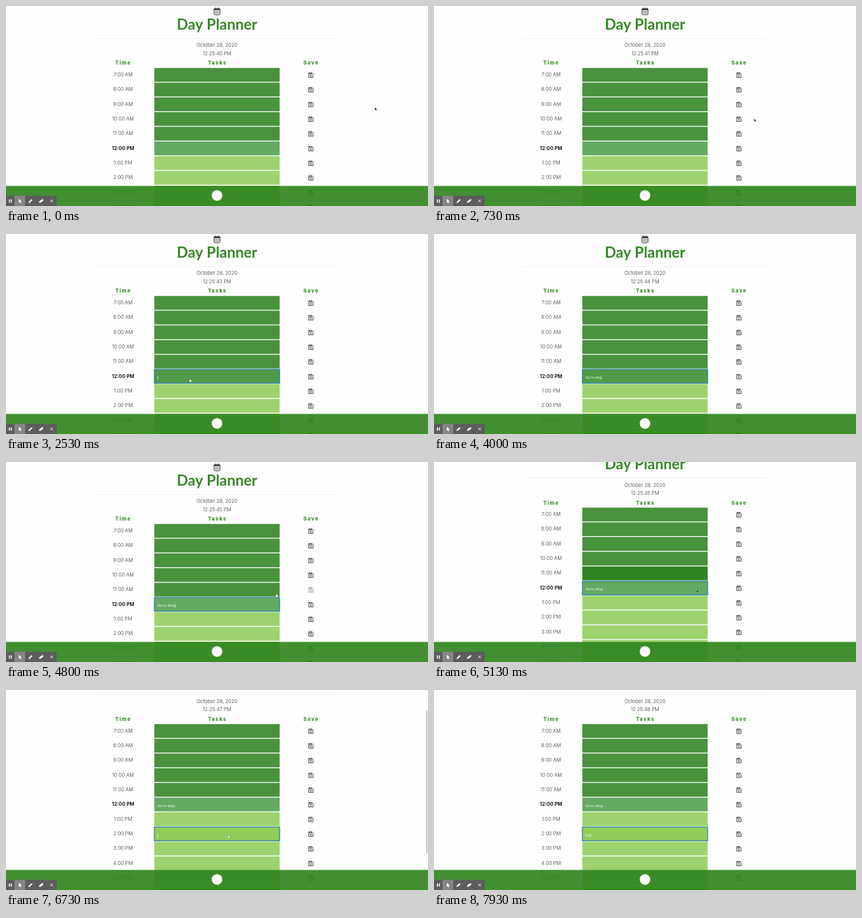
An HTML page with a canvas that plays this animation: 640 px wide and 304 px high, repeating every 8000 ms.

```html
<!DOCTYPE html>
<html lang="en">
<head>
<meta charset="utf-8">
<title>Day Planner</title>
<style>
  html, body { margin: 0; width: 100%; height: 100%; overflow: hidden; background: #fdfefd; }
  canvas { display: block; width: 640px; height: 304px; }
</style>
</head>
<body>
<canvas id="stage" width="640" height="304"></canvas>
<script>
const ctx = document.getElementById('stage').getContext('2d');
const LOOP = 8000;
const FONT = 'Inter, "Open Sans", sans-serif';
const PITCH = 22.35, ROW_TOP = 94.2, ROW_H = 21, CELL_X = 225, CELL_W = 190;

// base and hovered colours
const TONES = {
  past: [[74, 146, 62], [48, 132, 36]],
  now: [[101, 170, 98], [79, 155, 73]],
  next: [[157, 211, 110], [144, 204, 89]]
};

// row index -> [enter, leave]
const HOVERS = { 5: [830, 4560], 4: [4790, 5240], 6: [5240, 5640], 7: [5640, 1e5] };
const FOCUS = [
  { row: 5, from: 1460, to: 6460 },
  { row: 7, from: 6460, to: 1e5 }
];

// [time, x, y]
const MOUSE = [
  [0, 559, 154], [530, 559, 154], [1130, 276, 220], [1330, 278, 220],
  [4400, 278, 220], [4620, 462, 194], [4800, 409, 200], [4930, 398, 194],
  [5240, 398, 194], [5900, 336, 220], [8000, 336, 220]
];
const SCROLL = [[0, 0], [5000, 0], [5130, 24.6], [5200, 42.4], [8000, 42.4]];

const clamp = v => Math.max(0, Math.min(1, v));
const smooth = u => u * u * (3 - 2 * u);
const mix = (a, b, u) => a + (b - a) * u;

function track(keys, t, col, ease = u => u) {
  let i = 1;
  while (i < keys.length - 1 && t > keys[i][0]) i++;
  const a = keys[i - 1], b = keys[i];
  return mix(a[col], b[col], ease(clamp((t - a[0]) / (b[0] - a[0]))));
}

function pulse(t, from, to, fade = 200) {
  return Math.min(clamp((t - from) / fade), 1 - clamp((t - to) / fade));
}

function rect(x, y, w, h, color) {
  ctx.fillStyle = color;
  ctx.fillRect(x, y, w, h);
}

function rounded(x, y, w, h, r) {
  ctx.beginPath();
  ctx.roundRect(x, y, w, h, r);
}

function poly(points, fill, stroke, width = 0.6) {
  ctx.beginPath();
  points.forEach(([x, y]) => ctx.lineTo(x, y));
  ctx.closePath();
  if (stroke) {
    ctx.strokeStyle = stroke;
    ctx.lineWidth = width;
    ctx.stroke();
  }
  ctx.fillStyle = fill;
  ctx.fill();
}

function text(str, x, y, font, color, align = 'center', spacing = 0) {
  ctx.font = font + ' ' + FONT;
  ctx.textAlign = align;
  ctx.letterSpacing = spacing + 'px';
  ctx.fillStyle = color;
  ctx.fillText(str, x, y);
  ctx.letterSpacing = '0px';
}

function calendar() {
  ctx.strokeStyle = '#333';
  ctx.lineWidth = 1;
  rounded(315.5, 4, 9, 9.3, 1);
  ctx.stroke();
  rect(315.5, 4, 9, 2.3, '#333');
  rect(317.2, 2.4, 1.2, 2, '#333');
  rect(321.6, 2.4, 1.2, 2, '#333');
  for (let i = 0; i < 6; i++) {
    rect(317 + (i % 3) * 2.3, 7.7 + Math.floor(i / 3) * 2.3, 1.4, 1.4, '#444');
  }
}

function saveIcon(x, y, alpha) {
  ctx.save();
  ctx.translate(x, y);
  ctx.globalAlpha = alpha;
  ctx.strokeStyle = '#333';
  ctx.lineWidth = 0.9;
  ctx.beginPath();
  ctx.moveTo(-3.4, -3.4);
  ctx.lineTo(1.8, -3.4);
  ctx.lineTo(3.4, -1.8);
  ctx.lineTo(3.4, 3.4);
  ctx.lineTo(-3.4, 3.4);
  ctx.closePath();
  ctx.stroke();
  ctx.lineWidth = 0.7;
  ctx.strokeRect(-1.9, -3.3, 3.2, 2);
  ctx.beginPath();
  ctx.arc(0, 1, 1.1, 0, 7);
  ctx.stroke();
  ctx.restore();
}

function typed(row, t) {
  if (row === 5) {
    const n = t < 4200 ? Math.min(9, Math.floor((t - 3260) / 90) + 1) : 10;
    return 'Go to shop'.slice(0, Math.max(0, n));
  }
  if (row === 7) return 'Go'.slice(0, (t >= 7730) + (t >= 7860));
  return '';
}

function drawRow(i, t) {
  const y = ROW_TOP + i * PITCH, hour = 7 + i;
  const label = (hour > 12 ? hour - 12 : hour) + ':00 ' + (hour < 12 ? 'AM' : 'PM');
  const span = HOVERS[i];
  const over = span ? pulse(t, span[0], span[1]) : 0;
  const [base, lit] = TONES[i < 5 ? 'past' : i === 5 ? 'now' : 'next'];

  text(label, 177.5, y + 12.7, (i === 5 ? 700 : 300) + ' 7.5px', i === 5 ? '#222' : '#333');
  rect(CELL_X, y, CELL_W, ROW_H, `rgb(${base.map((c, k) => Math.round(mix(c, lit[k], over)))})`);

  const entry = typed(i, t);
  text(entry, 230, y + 14.4, '400 5.1px', '#fff', 'left');
  const width = ctx.measureText(entry).width;

  const focus = FOCUS.find(f => f.row === i && t >= f.from && t < f.to);
  if (focus) {
    ctx.strokeStyle = '#237da6';
    ctx.lineWidth = 1.2;
    ctx.strokeRect(CELL_X, y, CELL_W, ROW_H);
    const typing = i === 5 ? t > 3260 && t < 4500 : t > 7730;
    const blink = (t - focus.from + 40) % 1000 < 500;
    if (typing || blink) rect(230.4 + width, y + 9.7, 0.6, 6, '#fff');
  }
  const dim = i === 4 ? 0.5 * pulse(t, 4580, 4800, 100) : 0;
  saveIcon(462.4, y + 10.9, 1 - dim);
}

function drawPage(t) {
  ctx.save();
  ctx.translate(0, -track(SCROLL, t, 1));
  calendar();
  ctx.font = '700 22.5px Lato, "Open Sans", sans-serif';
  ctx.textAlign = 'center';
  ctx.fillStyle = '#358726';
  ctx.fillText('Day Planner', 320, 36);
  rect(135, 49, 370, 0.6, '#e4e6e4');
  text('October 28, 2020', 320, 62.4, '300 7.5px', '#333');
  const sec = 40 + Math.floor((t + 800) / 1000);
  text(`12:25:${sec} PM`, 320, 74.6, '300 7.4px', '#333');
  text('Time', 177.8, 89.4, '800 7.7px', '#3c912f', 'center', 1.2);
  text('Tasks', 320.5, 89.4, '800 7.7px', '#3c912f', 'center', 1.2);
  text('Save', 462.8, 89.4, '800 7.7px', '#3c912f', 'center', 1.2);
  for (let i = 0; i < 12; i++) drawRow(i, t);
  ctx.restore();
}

function drawFooter() {
  rect(0, 273.5, 640, 30.5, 'rgba(48, 132, 30, 0.91)');
  ctx.fillStyle = '#fff';
  ctx.beginPath();
  ctx.arc(320, 288, 8, 0, 7);
  ctx.fill();
}

function drawToolbar() {
  ctx.fillStyle = '#5d5d5d';
  rounded(0, 288.4, 77, 17, [0, 2, 0, 0]);
  ctx.fill();
  rect(13, 288.4, 16, 16, '#858585');
  rect(4.6, 294, 1.4, 5, '#fff');
  rect(7.4, 294, 1.4, 5, '#fff');
  poly([[19.5, 293], [19.5, 299.2], [21, 297.9], [22, 300], [22.9, 299.6], [22, 297.5], [23.9, 297.4]], '#fff');
  poly([[34.2, 299.4], [34.6, 297.5], [38.6, 293.5], [40.2, 295.1], [36.1, 299]], '#fff');
  poly([[50, 298], [51.4, 296], [55.8, 293.2], [56.8, 294.8], [55.6, 296.8], [51.2, 299.5]], '#fff');
  ctx.strokeStyle = '#fff';
  ctx.lineWidth = 0.9;
  ctx.beginPath();
  for (const s of [-1, 1]) {
    ctx.moveTo(67.2, 296.4 - 2 * s);
    ctx.lineTo(71.2, 296.4 + 2 * s);
  }
  ctx.stroke();
}

function drawScrollbar(t) {
  if (t < 5220) return;
  ctx.globalAlpha = 1 - clamp((t - 6500) / 400);
  ctx.fillStyle = '#858585';
  rounded(637, 31, 2.4, 217, 1.2);
  ctx.fill();
  ctx.globalAlpha = 1;
}

function drawMouse(t) {
  if ((t > 3260 && t < 4400) || t > 7730) return;
  const arrow = t < 830 || (t > 4900 && t < 5260);
  ctx.save();
  ctx.translate(track(MOUSE, t, 1, smooth), track(MOUSE, t, 2, smooth));
  if (arrow) {
    poly([[0.5, 0], [0.5, 4.3], [1.5, 3.5], [2.2, 5], [2.9, 4.7], [2.2, 3.2], [3.5, 3.1]], '#222', '#fff');
  } else {
    poly([[0.6, 0], [1.3, 0], [1.5, 2], [3.4, 2.5], [3.2, 4.6], [1.2, 4.7], [-0.7, 2.7], [0.6, 2.7]], '#fff', '#333', 0.5);
  }
  ctx.restore();
}

function draw(t) {
  rect(0, 0, 640, 304, '#fdfefd');
  drawPage(t);
  drawFooter();
  drawToolbar();
  drawScrollbar(t);
  drawMouse(t);
}

const start = performance.now();
function frame() {
  draw((performance.now() - start) % LOOP);
  requestAnimationFrame(frame);
}
frame();
</script>
</body>
</html>
```
